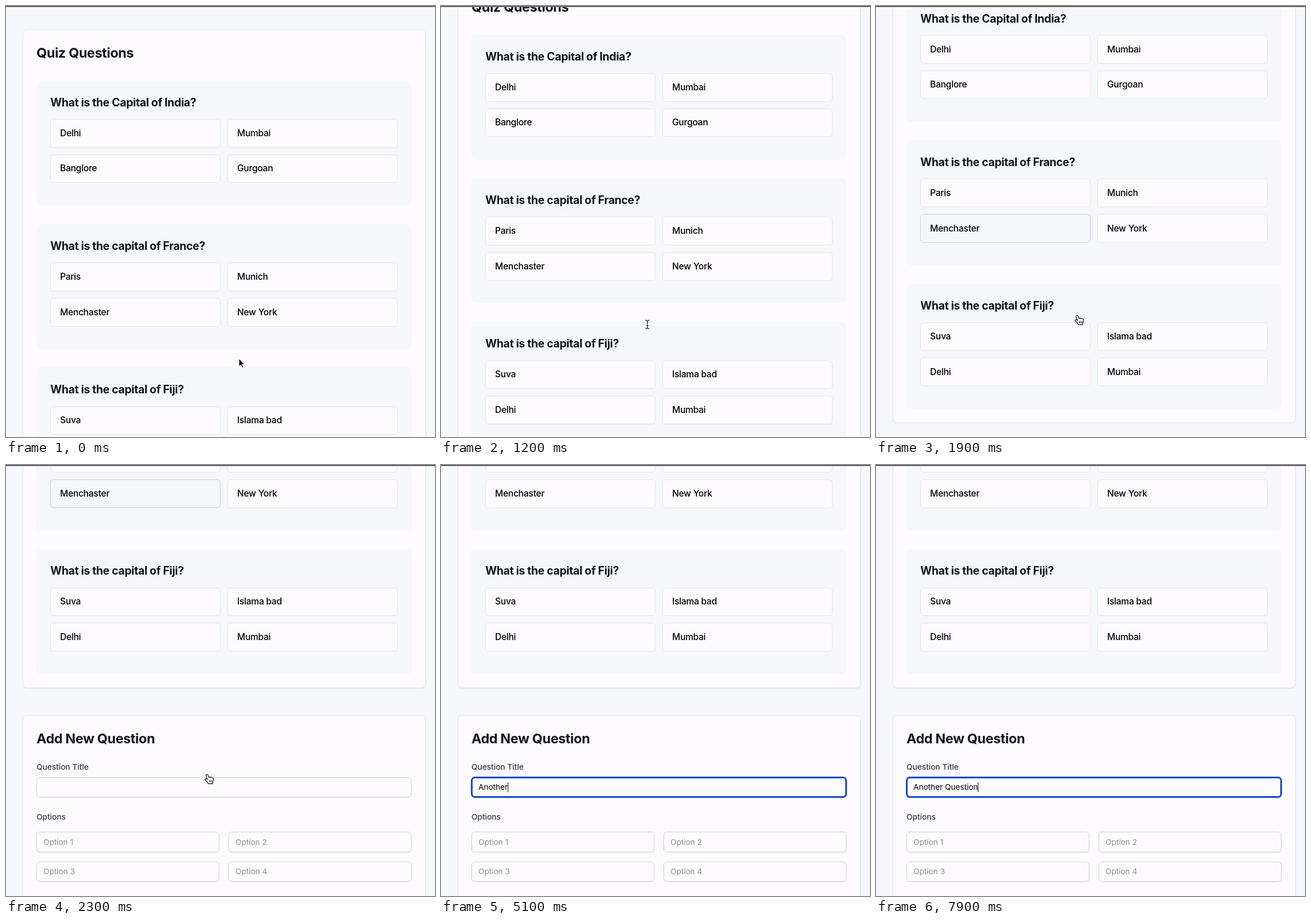
Animation of 746 by 751 pixels, one loop 8000 ms. Source, as an HTML page:

```html
<!DOCTYPE html>
<html lang="en">
<head>
<meta charset="utf-8">
<title>Quiz</title>
<style>
  html, body { margin: 0; width: 100%; height: 100%; overflow: hidden; }
  body { position: relative; background: #f5f7fa; font-family: Inter, sans-serif; font-optical-sizing: none; color: #000; }
  div, svg { position: absolute; box-sizing: border-box; }
  #page { left: 0; top: 0; width: 746px; height: 1620px; }
  #bar { left: 0; top: 0; width: 100%; height: 2px; background: #4b434b; border-bottom: 0.5px solid #8d878d; }
  .text { white-space: pre; line-height: 30px; height: 30px; }
  .card { background: #fdfbfe; border: 1px solid #e3e6ea; border-radius: 8px; box-shadow: 0 1px 2px rgba(0,0,0,.05); }
  .block { background: #f5f7fa; border-radius: 8px; }
  .option { background: #fdfbfe; border: 1px solid #e2e5e9; border-radius: 6px; }
  .input { background: #fdfbfe; border: 1px solid #cfd2d8; border-radius: 6px; box-shadow: 0 1px 2px rgba(0,0,0,.06); }
  .button { background: #4338dc; border-radius: 6px; box-shadow: 0 1px 2px rgba(0,0,0,.06); }
  .title { font-size: 23.3px; font-weight: 700; letter-spacing: -.36px; color: #11131f; }
  .question { font-size: 19.4px; font-weight: 650; letter-spacing: -.35px; color: #11131f; }
  .body { font-size: 15.5px; font-weight: 450; letter-spacing: -.23px; }
  .label { font-size: 13.65px; font-weight: 500; color: #303947; }
  .hint { font-size: 13.6px; color: #8b8e95; }
  .typed { font-size: 13.6px; }
  .action { font-size: 13.6px; font-weight: 600; color: #fdfbfe; text-align: center; }
  #ring { border: 3px solid #1149c8; border-radius: 7px; }
  #caret { width: 1px; height: 17px; background: #111; }
  .cursor { left: 0; top: 0; overflow: visible; }
</style>
</head>
<body>
<div id="page"></div>
<div id="bar"></div>
<svg class="cursor" id="arrow" width="1" height="1">
  <path d="M0 0V14.5L3.4 11.4L5.8 16.8L8.2 15.7L5.9 10.5H10.2Z" fill="#000" stroke="#fff" stroke-width="1.2"/>
</svg>
<svg class="cursor" id="beam" width="1" height="1" fill="none">
  <defs><path id="beamShape" d="M-3.5-7.5Q-.4-7.5 0-5.5Q.4-7.5 3.5-7.5M0-5.5V5.5M-3.5 7.5Q-.4 7.5 0 5.5Q.4 7.5 3.5 7.5M-2 2H2"/></defs>
  <use href="#beamShape" stroke="#fff" stroke-width="2.6"/>
  <use href="#beamShape" stroke="#111" stroke-width="1.2"/>
</svg>
<svg class="cursor" id="hand" width="1" height="1">
  <path d="M-3.6 0C-3-1.2-1.4-1-.9.2L.8 4.3C1.4 3.2 3 3.3 3.6 4.5C4.4 3.7 5.7 3.9 6.2 5C7.4 4.4 8.5 5 8.7 6.4C9.2 9.4 8.7 11.4 7.3 13.2V15.4H-.6V14C-2.3 12.2-3.4 10.4-5.6 8.5C-6.7 7.3-5 6-3.6 6.9L-1.9 7.8L-4 1.7Q-4.2.7-3.6 0Z" fill="#fff" stroke="#111" stroke-width="1.2" stroke-linejoin="round"/>
  <path d="M1.6 9V12.5M3.8 9V12.5M6 9V12.5" stroke="#111" stroke-width="1"/>
</svg>
<script>
const LOOP = 8000;
const $ = id => document.getElementById(id);
const page = $("page");

function box(cls, left, top, right, bottom) {
  const el = document.createElement("div");
  el.className = cls;
  Object.assign(el.style, {
    left: left + "px", top: top + "px",
    width: right - left + "px", height: bottom - top + "px"
  });
  page.append(el);
  return el;
}

// Places a line of text by its vertical centre.
function text(cls, str, x, middle) {
  const el = document.createElement("div");
  el.className = "text " + cls;
  el.textContent = str;
  el.style.left = x + "px";
  el.style.top = middle - 15 + "px";
  page.append(el);
  return el;
}

function input(left, top, right, hint = "") {
  box("input", left, top, right, top + 35.5);
  text("hint", hint, left + 12, top + 17.5);
}

function button(label, left, right) {
  box("button", left, 1472.5, right, 1508);
  text("action", label, left, 1490).style.width = right - left + "px";
}

const quiz = [
  ["What is the Capital of India?", "Delhi", "Mumbai", "Banglore", "Gurgoan"],
  ["What is the capital of France?", "Paris", "Munich", "Menchaster", "New York"],
  ["What is the capital of Fiji?", "Suva", "Islama bad", "Delhi", "Mumbai"]
];
let hovered;

box("card", 28.5, 41, 729.5, 872.5);
text("title", "Quiz Questions", 53, 82);
quiz.forEach(([question, ...options], q) => {
  const top = 129.5 + q * 250.25;
  box("block", 53, top, 705, top + 218);
  text("question", question, 77, top + 38);
  options.forEach((option, i) => {
    const x = 77 + (i % 2) * 308, y = top + 67.5 + (i >> 1) * 61.75;
    const el = box("option", x, y, x + 296, y + 49.5);
    if (option === "Menchaster") hovered = el;
    text("body", option, x + 17, y + 24.5);
  });
});

box("card", 28.5, 919.5, 729.5, 1532.5);
text("title", "Add New Question", 53, 960.5);
text("label", "Question Title", 53, 1009.5);
input(53, 1027.5, 705);
text("label", "Options", 53, 1097);
for (let i = 0; i < 4; i++) {
  const x = 53 + (i % 2) * 334;
  input(x, 1123 + (i >> 1) * 51.5, x + 318, "Option " + (i + 1));
}
text("label", "Correct Option (1-4)", 53, 1244);
input(53, 1262, 705);
text("label", "Explanation", 53, 1331.5);
const area = box("input", 53, 1349.5, 705, 1448.5);
area.innerHTML = '<svg width="9" height="9" style="right:0;bottom:0" stroke="#555" stroke-width=".9"><path d="M.5 8L8 .5M4.5 8L8 4.5"/></svg>';
button("Add Question", 53, 192);
button("Clear Form", 342.5, 464);
const error = text("body", 'error-response" at <.Correct>: can\'t evaluate field Correct in type []main.Question', 0, 1599);
error.style.left = "auto";
error.style.right = 746 - 561 + "px";

const ring = box("", 52, 1026.5, 706, 1064);
ring.id = "ring";
const typed = text("typed", "", 65, 1045);
const caret = box("", 65, 1036.5, 66, 1053.5);
caret.id = "caret";

const phrase = "Another Question";
const keyTimes = [4300, 4500, 4700, 4800, 4900, 5000, 5100, 5300, 5500, 5700, 6000, 6600, 6800, 7000, 7400, 7800];

const progress = (t, a, b) => Math.min(1, Math.max(0, (t - a) / (b - a)));
const smooth = p => p * p * (3 - 2 * p);
const easeOut = p => 1 - (1 - p) ** 3;

function scrollAt(t) {
  if (t < 970) return 847 * smooth(progress(t, 40, 680));
  if (t < 1850) return 847 * Math.exp(-(t - 970) / 98);
  return 484 * easeOut(progress(t, 1850, 2300));
}

const path = [[0, 405, 614], [100, 405, 614], [650, 374, 588], [950, 374, 588],
  [1350, 352, 540], [2990, 352, 540], [3500, 274.5, 560], [LOOP, 274.5, 560]];

function pointerAt(t) {
  const i = path.findIndex(p => p[0] > t);
  const [t0, x0, y0] = path[i - 1], [t1, x1, y1] = path[i];
  const p = smooth(progress(t, t0, t1));
  return [x0 + (x1 - x0) * p, y0 + (y1 - y0) * p];
}

function cursorAt(t) {
  if (t < 600) return "arrow";
  if (t < 1300) return "beam";
  if (t < 2450) return "hand";
  if (t < 3150) return "arrow";
  return t < 4300 ? "beam" : "";
}

const show = (el, on) => el.style.visibility = on ? "visible" : "hidden";

function draw(now) {
  const t = now % LOOP;
  page.style.transform = `translateY(${-Math.round(scrollAt(t) * 2) / 2}px)`;

  const hover = progress(t, 1430, 1600) - progress(t, 2450, 2600);
  const mix = (a, b) => Math.round(a + (b - a) * hover);
  hovered.style.background = `rgb(${mix(253, 245)},${mix(251, 247)},${mix(254, 250)})`;
  hovered.style.borderColor = `rgb(${mix(226, 203)},${mix(229, 207)},${mix(233, 213)})`;

  show(ring, t >= 3600);
  typed.textContent = phrase.slice(0, keyTimes.filter(k => k <= t).length);
  caret.style.left = 65 + typed.getBoundingClientRect().width + "px";
  show(caret, t >= 3600 && (t < 3850 || t >= 4100));

  const [x, y] = pointerAt(t), active = cursorAt(t);
  for (const id of ["arrow", "beam", "hand"]) {
    show($(id), id === active);
    $(id).style.transform = `translate(${x}px,${y}px)`;
  }
  requestAnimationFrame(draw);
}
requestAnimationFrame(draw);
</script>
</body>
</html>
```
